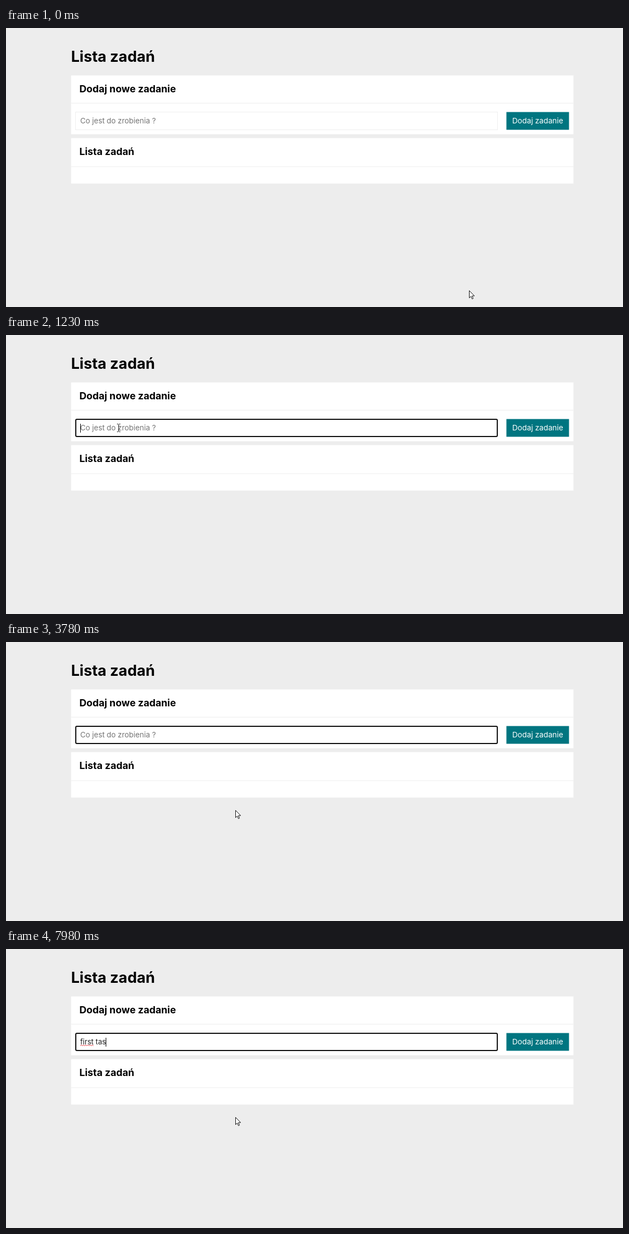
Animation of 1114 by 503 pixels, one loop 8000 ms. Source, as an HTML page:

```html
<!DOCTYPE html>
<html lang="pl">
<head>
<meta charset="utf-8">
<title>Lista zadań</title>
<style>
  html, body { margin: 0; width: 100%; height: 100%; overflow: hidden; background: #ededed; }
  svg { display: block; font-family: Inter, "Open Sans", sans-serif; }
  .title { font-size: 27.2px; font-weight: 700; }
  .head { font-size: 17.8px; font-weight: 700; }
  .panel { fill: #fff; }
  .line { fill: #eee; }
  .button { font-size: 13.7px; fill: #fff; text-anchor: middle; }
  #hint { font-size: 13.4px; fill: #757575; }
  #typed { font-size: 13.1px; fill: #222; white-space: pre; }
  #halo { fill: #fff000; opacity: .72; }
</style>
</head>
<body>
<svg width="1114" height="503" viewBox="0 0 1114 503">
  <rect width="1114" height="503" fill="#ededed"/>
  <text class="title" x="117.5" y="61">Lista zadań</text>

  <rect class="panel" x="117.5" y="85.5" width="907" height="106"/>
  <text class="head" x="132.5" y="116">Dodaj nowe zadanie</text>
  <rect class="line" x="117.5" y="135" width="907" height="1"/>
  <rect x="125.5" y="151.5" width="762" height="32" fill="#fff" stroke="#eee"/>
  <rect id="focus" x="126" y="152" width="761" height="31" rx="2" fill="#fff" stroke="#101010" stroke-width="2"/>
  <text id="hint" x="134" y="172">Co jest do zrobienia ?</text>
  <text id="typed" x="134" y="172"></text>
  <path id="squiggle" fill="none" stroke="#e5484d"/>
  <rect id="caret" y="160" width="1" height="16"/>
  <rect x="903.5" y="151.5" width="113" height="32" fill="#007580"/>
  <text class="button" x="960" y="172">Dodaj zadanie</text>

  <rect class="panel" x="117.5" y="198.5" width="907" height="82"/>
  <text class="head" x="132.5" y="229">Lista zadań</text>
  <rect class="line" x="117.5" y="249.5" width="907" height="1"/>

  <circle id="halo" cx="202" cy="166.5" r="10"/>
  <path id="arrow" d="M.5 .5V13.6L3.5 10.8L5.6 15.5L7.6 14.6L5.5 10H9.7Z" fill="#fff" stroke="#111"/>
  <path id="beam" d="M-2.5 -6.5H-.5L.5 -5.5L1.5 -6.5H3.5M.5 -5.5V6.5M-2.5 7.5H-.5L.5 6.5L1.5 7.5H3.5" fill="none" stroke="#111"/>
</svg>
<script>
const LOOP = 8000;
const STEP = 67.5;  // time between pointer updates
const BLINK = 530;
const CLICK_AT = 1110, FOCUS_AT = 1170, RELEASE_AT = 1230;
const PHRASE = "first tas";
const KEY_TIMES = [4310, 4580, 5180, 5450, 5780, 6310, 7440, 7780, 7980];
const TEXT_X = 134;

// each axis slows down by its own power
const START = { x: 836, y: 473 };
const MOVES = [
  { at: 80, steps: 12, x: 203, y: 167, powX: 2.1, powY: 1.32 },
  { at: 2170, steps: 5, x: 406, y: 296, powX: 0.6, powY: 1.6 },
  { at: 2580, steps: 2, x: 414, y: 303, powX: 1, powY: 1 }
];

const el = {};
for (const node of document.querySelectorAll("[id]")) el[node.id] = node;

const show = (node, on) => node.setAttribute("visibility", on ? "visible" : "hidden");
const ease = (from, to, u, pow) => Math.round(to + (from - to) * (1 - u) ** pow);

let wave = `M${TEXT_X} 174.5`;
for (let i = 1; i <= 12; i++) wave += `l2 ${i % 2 ? -1.5 : 1.5}`;
el.squiggle.setAttribute("d", wave);

function pointerAt(t) {
  let pos = START;
  for (const m of MOVES) {
    if (t < m.at) break;
    const u = Math.min(Math.floor((t - m.at) / STEP) + 1, m.steps) / m.steps;
    pos = { x: ease(pos.x, m.x, u, m.powX), y: ease(pos.y, m.y, u, m.powY) };
  }
  return pos;
}

function drawPointer(t) {
  const { x, y } = pointerAt(t);
  const overField = x >= 125 && x < 888 && y >= 151 && y < 184;
  const node = overField ? el.beam : el.arrow;
  node.setAttribute("transform", `translate(${x} ${y})`);
  show(el.beam, overField);
  show(el.arrow, !overField);
  show(el.halo, t >= CLICK_AT && t < RELEASE_AT);
}

function drawField(t) {
  const count = KEY_TIMES.filter(k => k <= t).length;
  const focused = t >= FOCUS_AT;
  el.typed.textContent = PHRASE.slice(0, count);
  const width = count ? el.typed.getComputedTextLength() : 0;
  el.caret.setAttribute("x", Math.floor(TEXT_X + width));

  // every key press restarts the blinking
  const lastInput = count ? KEY_TIMES[count - 1] : CLICK_AT;
  const lit = Math.floor((t - lastInput) / BLINK) % 2 === 0;
  show(el.caret, focused && lit);
  show(el.focus, focused);
  show(el.hint, !count);
  show(el.squiggle, count > PHRASE.indexOf(" "));
}

const start = performance.now();
function frame() {
  const t = (performance.now() - start) % LOOP;
  drawPointer(t);
  drawField(t);
  requestAnimationFrame(frame);
}
frame();
</script>
</body>
</html>
```
